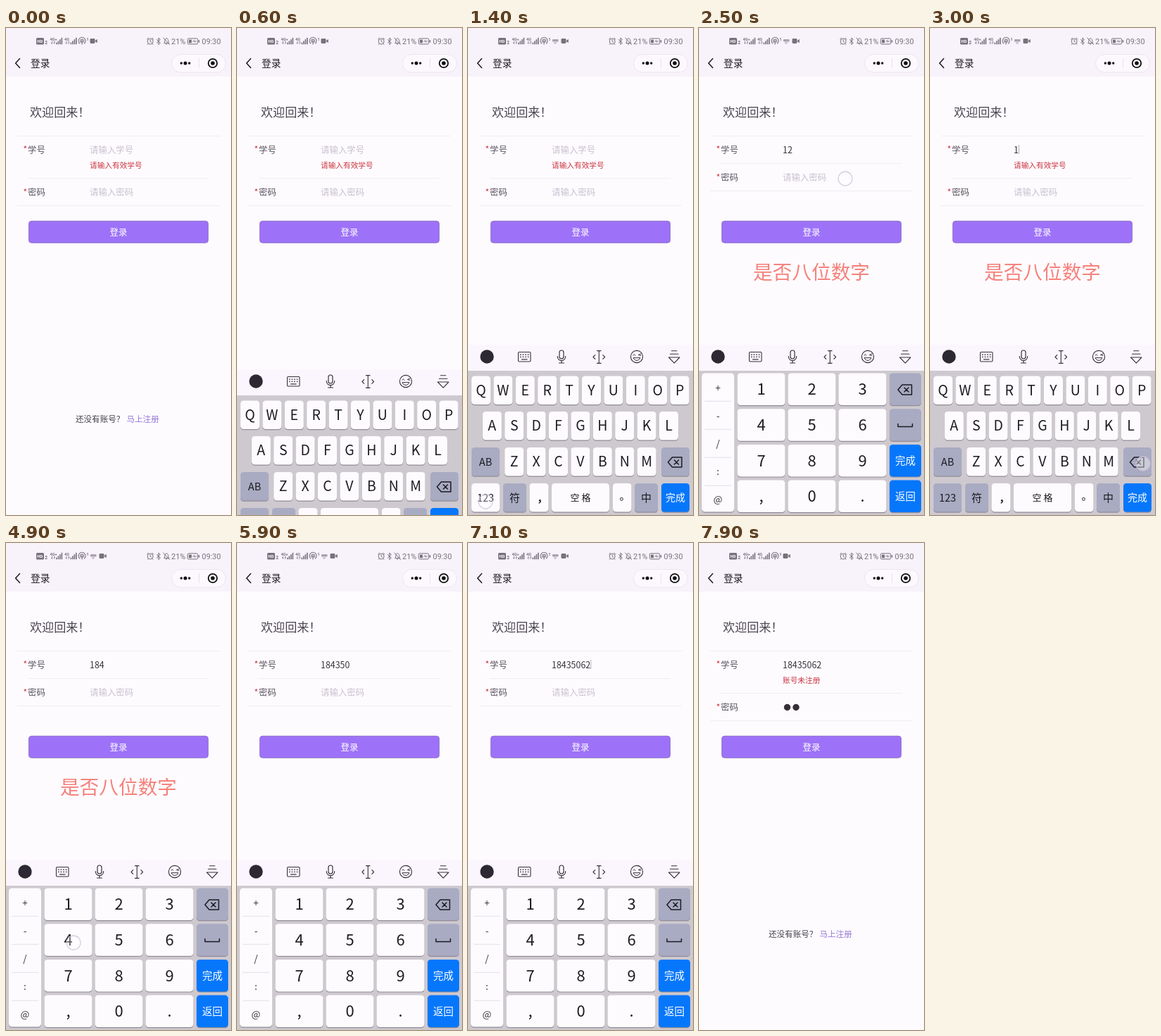
Write an HTML page that moves like this. It is 320x692 px and loops after 8000 ms.

```html
<!DOCTYPE html>
<html lang="zh-CN">
<head>
<meta charset="utf-8">
<title>登录</title>
<style>
  html, body { margin: 0; width: 100%; height: 100%; overflow: hidden; background: #fefbff; }
  svg { display: block; width: 100vw; height: 100vh; }
  text { font-family: "Noto Sans CJK SC", "Noto Sans CJK", "Noto Sans", sans-serif; white-space: pre; }
  .roboto { font-family: Roboto, "Noto Sans", sans-serif; }
</style>
</head>
<body>
<svg id="stage" viewBox="0 0 320 692"></svg>
<script>
const LOOP = 8000, STEP = 100;
const INK = '#353038', GREY = '#77717c', LINE = '#f1ecf2', RED = '#c9363f', HINT = '#c8c0cf';
const stage = document.getElementById('stage');

function el(parent, tag, attrs = {}) {
  const node = document.createElementNS('http://www.w3.org/2000/svg', tag);
  for (const name in attrs) node.setAttribute(name, attrs[name]);
  parent.append(node);
  return node;
}
const group = (parent, attrs) => el(parent, 'g', attrs);
const rect = (parent, x, y, width, height, fill, rx = 0, more = {}) =>
  el(parent, 'rect', { x, y, width, height, fill, rx, ...more });
const circle = (parent, cx, cy, r, attrs) => el(parent, 'circle', { cx, cy, r, ...attrs });
const stroke = (parent, d, color = INK, width = 1, more = {}) =>
  el(parent, 'path', { d, fill: 'none', stroke: color, 'stroke-width': width,
    'stroke-linecap': 'round', 'stroke-linejoin': 'round', ...more });
const line = (parent, x1, x2, y) => rect(parent, x1, y, x2 - x1, 1, LINE);

// y is the optical middle of the glyphs
function label(parent, str, x, y, size, fill = INK, more = {}) {
  const node = el(parent, 'text', { x, y: y + size * 0.37, 'font-size': size, fill, ...more });
  node.textContent = str;
  return node;
}
const MID = { 'text-anchor': 'middle' };
const show = (node, on) => node.setAttribute('display', on ? 'inline' : 'none');

// ---- status bar and header ----
rect(stage, 0, 0, 320, 692, '#fefbff');
rect(stage, 0, 0, 320, 69, '#f8f2fa');
const bar = group(stage);
const tiny = { class: 'roboto', 'font-weight': 700 };
rect(bar, 43, 14, 11, 9.5, GREY, 1.5);
label(bar, 'HD', 44.3, 18.8, 6, '#fff', tiny);
label(bar, '2', 55.3, 20.6, 6.5, GREY, tiny);
function signal(x, tag) {
  label(bar, tag, x, 15.6, 5.6, GREY, tiny);
  stroke(bar, `M${x + 3} 19v3.5l-1.3-1.4M${x + 6} 22.5v-3.5l1.3 1.4`, GREY, 0.8);
  for (let i = 0; i < 4; i++) {
    const h = 2.5 + i * 2.3;
    rect(bar, x + 8.6 + i * 2.5, 23.2 - h, 1.6, h, GREY);
  }
}
signal(62.5, '4G+');
signal(83, '4G');
stroke(bar, 'M104.8 22a5 5 0 1 1 6.6 0M106.6 20.2a2.4 2.4 0 1 1 3 0', GREY, 1.1);
circle(bar, 108.1, 18.6, 1.1, { fill: GREY });
stroke(bar, 'M108.1 19v4', GREY, 1.2);
label(bar, '1', 114.2, 15.5, 6, GREY, tiny);
const imeIcon = group(bar);
rect(imeIcon, 120, 16, 8.5, 3.6, '#aaa3af', 0.8);
stroke(imeIcon, 'M122.5 21h3.5l-1.8 1.2z', '#aaa3af', 0.8);
const video = group(bar);
rect(video, 119.5, 15, 7, 7, GREY, 1.4);
el(video, 'path', { d: 'M126.8 18l3-2.2v5.4l-3-2.2z', fill: GREY });

circle(bar, 205.2, 19, 4, { fill: 'none', stroke: GREY });
stroke(bar, 'M205.2 16.8v2.4l1.6 1M200.6 16l2-2M209.8 16l-2-2M202.3 22.4l-1 1M208 22.4l1 1', GREY, 1);
stroke(bar, 'M214.4 16.5l5 4.7-2.5 2.4v-9.6l2.5 2.4-5 4.7', GREY, 1);
stroke(bar, 'M225 21.3c1-1 .7-4 1.2-5 .8-2 3.4-2 4.2 0 .5 1 .2 4 1.2 5zM227.3 23h1.6M223.8 14l8.8 9.6', GREY, 1);
label(bar, '21%', 235, 19, 11, GREY, { class: 'roboto' });
rect(bar, 258.3, 14.9, 14.4, 8, 'none', 1.6, { stroke: GREY });
rect(bar, 260, 16.6, 4, 4.6, GREY);
stroke(bar, 'M265.5 19.4l2.6-1.8v2.6l2.6-1.8', GREY, 0.9);
rect(bar, 273.6, 17.2, 1.6, 3.4, GREY);
label(bar, '09:30', 278.6, 19, 10.8, GREY, { class: 'roboto' });

stroke(stage, 'M19.5 43.6L13.6 50l5.9 6.4', '#1d1a20', 1.5);
label(stage, '登录', 35, 50, 13.7, '#1d1a20', { 'font-weight': 500 });
rect(stage, 235.5, 37.5, 77, 25.5, '#fcf8fe', 12.7, { stroke: '#e7e0ea', 'stroke-width': 0.8 });
[[249.3, 1.7], [255, 2.5], [260.7, 1.7]].forEach(([x, r]) => circle(stage, x, 50, r, { fill: '#111' }));
rect(stage, 274, 43, 0.8, 14, '#e5dee8');
circle(stage, 294, 50, 6.2, { fill: 'none', stroke: '#111', 'stroke-width': 1.8 });
circle(stage, 294, 50, 2.8, { fill: '#111' });

// ---- login form ----
label(stage, '欢迎回来！', 34, 120, 17.1, '#4b4550');
line(stage, 16, 304, 153);
const star = (parent, y) => label(parent, '*', 24.6, y + 1, 12, '#d2303a');
star(stage, 172);
label(stage, '学号', 31, 173, 12.44, '#5c5661');
const idText = label(stage, '', 119, 173, 12.44);
const caret = rect(stage, 0, 166, 0.8, 13, '#a79eac');
const errorText = label(stage, '', 119, 195, 10.66, RED);

const lower = group(stage);
line(lower, 31, 288, 213);
star(lower, 233);
label(lower, '密码', 31, 233.5, 12.44, '#5c5661');
const pwHint = label(lower, '请输入密码', 119, 233.5, 12.44, HINT);
const dots = [125.5, 138].map(x => circle(lower, x, 233.5, 4.7, { fill: INK }));
line(lower, 16, 304, 252);

rect(stage, 32.4, 274.3, 255.2, 31, '#9d72f8', 4, { stroke: '#8668bd', 'stroke-width': 0.8 });
label(stage, '登录', 160, 290, 12.44, '#fff', MID);
label(stage, '还没有账号？', 99, 556, 11.56, '#453f4a');
label(stage, '马上注册', 171.5, 556, 11.56, '#9476d6');
const caption = label(stage, '是否八位数字', 160, 346.5, 27.7, '#f5827b', { ...MID, 'font-weight': 500 });

// ---- keyboards ----
const board = group(stage);
rect(board, 0, 450, 320, 300, '#fbf6fd');
rect(board, 0, 487, 320, 263, '#cec9cf');
circle(board, 27, 467, 9.7, { fill: '#2d2932' });
rect(board, 71.5, 460.5, 17.5, 13.5, 'none', 1.2, { stroke: INK, 'stroke-width': 1.1 });
for (let i = 0; i < 8; i++) rect(board, 74 + (i % 4) * 3.6, 463.5 + (i >> 2) * 3.2, 1.6, 1.4, INK);
rect(board, 76, 470.3, 8.5, 1.2, INK);
rect(board, 130, 458, 6, 12, 'none', 3, { stroke: INK, 'stroke-width': 1.2 });
stroke(board, 'M127.3 466.5c0 8 11.4 8 11.4 0M133 472.6v3.4M129.5 476h7', INK, 1.2);
stroke(board, 'M186.3 459v17M183.5 458.6h5.6M183.5 476.4h5.6M180.8 464.6l-2.8 2.9 2.8 2.9M191.8 464.6l2.8 2.9-2.8 2.9', INK, 1.1);
circle(board, 240, 467, 8.6, { fill: 'none', stroke: INK, 'stroke-width': 1.1 });
stroke(board, 'M235.2 469c1.6 4.6 8 4.6 9.6 0zM235 465.2l1.5-1.3 1.5 1.3M246 463l-3.6 1.5 3.6 1', INK, 1);
stroke(board, 'M289.5 458.8h7.5M287.5 463.3h11.5M285.5 468h15.5l-7.7 8.2z', INK, 1.1);

const WHITE = '#fefbff', DIM = '#a8abc2', BLUE = '#0677fb';
function key(parent, x, y, w, h, text, size, fill = WHITE) {
  rect(parent, x, y + 1.2, w, h, '#918c97', 4.5);
  const face = rect(parent, x, y, w, h, fill, 4.5);
  if (text) label(parent, text, x + w / 2, y + h / 2, size, fill === BLUE ? '#fff' : '#1d1a20', MID);
  return face;
}
const eraser = (parent, x, y) => stroke(parent,
  `M${x - 10} ${y}l6-7h13.5v14h-13.5zM${x - 1} ${y - 3}l6 6M${x + 5} ${y - 3}l-6 6`, '#1d1a20', 1.5);

const letters = group(board);
[['QWERTYUIOP', 5, 494.5], ['ASDFGHJKL', 20.8, 545], ['ZXCVBNM', 52.2, 596]].forEach(([row, x, y]) =>
  [...row].forEach((c, i) => key(letters, x + i * 31.4, y, 27, 40.5, c, 19.5)));
key(letters, 5, 596, 40, 40.5, 'AB', 14.5, DIM);
key(letters, 275, 596, 40, 40.5, '', 0, DIM);
eraser(letters, 294.5, 617);
const numKey = key(letters, 5, 647, 40, 40.5, '123', 14.5, DIM);
key(letters, 50, 647, 33, 40.5, '符', 15, DIM);
key(letters, 87.5, 647, 27, 40.5);
label(letters, '，', 98, 667, 15, '#1d1a20', { 'font-weight': 700 });
key(letters, 119, 647, 82, 40.5, '空 格', 13);
key(letters, 206, 647, 26.5, 40.5);
label(letters, '。', 215.5, 664, 15, '#1d1a20');
key(letters, 237, 647, 33, 40.5, '中', 15, DIM);
key(letters, 275, 647, 40, 40.5, '完成', 14, BLUE);

const numbers = group(board);
key(numbers, 4, 490.5, 46, 197, '', 0);
['+', '-', '/', ':', '@'].forEach((c, i) => {
  label(numbers, c, 27, 511 + i * 39.8, 13.5, INK, MID);
  if (i) rect(numbers, 8, 489.8 + i * 40, 38, 0.8, '#ded8e1');
});
const rowY = i => 490.5 + i * 50.7;
['1', '2', '3', '4', '5', '6', '7', '8', '9', ',', '0', '.'].forEach((c, i) =>
  key(numbers, 54.5 + (i % 3) * 72, rowY(Math.floor(i / 3)), 68, 45.5, c, 22));
['', '', '完成', '返回'].forEach((c, i) => key(numbers, 271, rowY(i), 45, 45.5, c, 14.5, i < 2 ? DIM : BLUE));
eraser(numbers, 293, 514);
stroke(numbers, 'M283 562.5v4h20.5v-4', '#1d1a20', 1.5);

const ring = circle(stage, 0, 0, 10, { fill: '#fff', 'fill-opacity': 0.4, stroke: '#c8bfd6', 'stroke-width': 1.3 });

// ---- timeline: [from ms, value] ----
const at = (track, t) => track.reduce((v, [from, next]) => (t >= from ? next : v), track[0][1]);
const ID = '18435062';
const idTrack = [[0, ''], [1800, '1'], [2200, '12'], [3000, '1'], [3300, ''], [4200, '1'],
  [4600, ID.slice(0, 2)], [4900, ID.slice(0, 3)], [5200, ID.slice(0, 4)], [5500, ID.slice(0, 5)],
  [5800, ID.slice(0, 6)], [6400, ID.slice(0, 7)], [6900, ID]];
const BAD = '请输入有效学号';
const errorTrack = [[0, BAD], [1800, ''], [2800, BAD], [4200, ''], [7800, '账号未注册']];
const boardTrack = [[0, 242], [500, 130], [600, 35], [700, 0], [7700, 130], [7800, 242]];
const numericTrack = [[0, false], [1500, true], [2600, false], [3800, true], [7400, false]];
const dotTrack = [[0, 0], [7500, 1], [7600, 2]];
const focusTrack = [[0, false], [700, true], [2500, false], [2900, true], [7300, false]];
const taps = [[300, 200, 173], [1300, 25, 673], [1700, 98, 516], [2100, 168, 517], [2400, 208, 214],
  [2800, 190, 174], [3000, 303, 619], [3300, 302, 619], [3700, 25, 672], [4100, 103, 517],
  [4500, 166, 619], [4800, 96, 568], [5100, 240, 517], [5400, 168, 568], [5700, 165, 668],
  [6300, 238, 568], [6800, 168, 517], [7200, 205, 213], [7600, 170, 290]];

function draw(t) {
  const id = at(idTrack, t), error = at(errorTrack, t), shift = at(boardTrack, t);
  const numeric = at(numericTrack, t), count = at(dotTrack, t);

  idText.textContent = id || '请输入学号';
  idText.setAttribute('fill', id ? INK : HINT);
  caret.setAttribute('x', 119.2 + id.length * 6.9);
  show(caret, id && at(focusTrack, t) && t % 1000 < 500);
  errorText.textContent = error;
  lower.setAttribute('transform', `translate(0 ${error ? 0 : -21})`);
  show(pwHint, !count);
  dots.forEach((dot, i) => show(dot, i < count));
  show(caption, t >= 1900 && t < 5500);

  show(board, shift < 242);
  board.setAttribute('transform', `translate(0 ${shift})`);
  show(letters, !numeric);
  show(numbers, numeric);
  numKey.setAttribute('fill', (t >= 1300 && t < 1500) || t === 3700 ? WHITE : DIM);
  const typing = shift === 0;
  show(imeIcon, typing);
  video.setAttribute('transform', `translate(${typing ? 13 : 0} 0)`);

  const tap = taps.find(([from]) => t >= from && t < from + 200);
  show(ring, tap);
  if (tap) {
    ring.setAttribute('cx', tap[1]);
    ring.setAttribute('cy', tap[2]);
    ring.setAttribute('opacity', t === tap[0] ? 1 : 0.75);
  }
}

function tick() {
  draw(Math.floor(performance.now() % LOOP / STEP) * STEP);
  requestAnimationFrame(tick);
}
tick();
</script>
</body>
</html>
```
